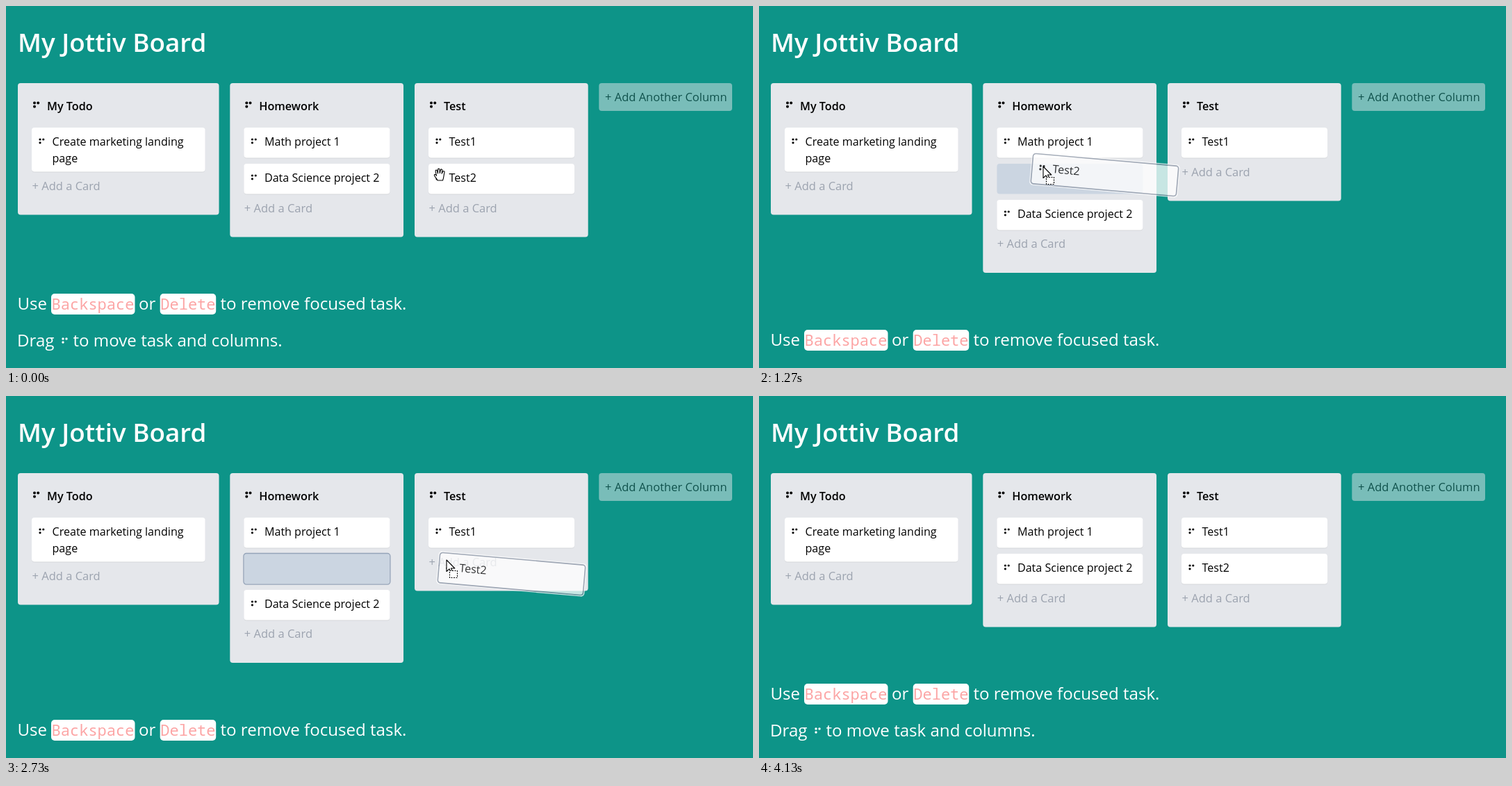
Recreate the animation shown at these times as an HTML page. Size 1075 by 521 pixels, loop 4.47 s.

```html
<!DOCTYPE html>
<html lang="en">
<head>
<meta charset="utf-8">
<title>Task board</title>
<style>
  html, body { margin: 0; width: 100%; height: 100%; overflow: hidden; background: #0d9488; }
  svg { display: block; width: 1075px; height: 521px; }
  text { font: 16.1px "Open Sans", "Noto Sans", sans-serif; fill: #000; white-space: pre; }
  .title { font-size: 36.8px; font-weight: 600; fill: #fff; }
  .head { font-size: 16.2px; font-weight: 600; }
  .add { font-size: 16.5px; fill: #9ca3af; }
  .note { font-size: 24.1px; fill: #fff; }
  .key { font: 22px "Noto Sans Mono", "DejaVu Sans Mono", monospace; fill: #fca5a5; }
  .cursor { fill: #fff; stroke: #000; stroke-width: 1.1; stroke-linejoin: round; }
</style>
</head>
<body>
<svg id="stage" viewBox="0 0 1075 521"></svg>
<script>
const LOOP = 4470;
const CARD_W = 210, CARD_H = 43.6, TILT = 5;

const text = (x, y, cls, str) => `<text x="${x}" y="${y}" class="${cls}">${str}</text>`;

const box = (x, y, w, h, fill, extra = '') =>
  `<rect x="${x}" y="${y}" width="${w}" height="${h}" rx="4" fill="${fill}" ${extra}/>`;

const dots = (x, y, r, gap, fill = '#000') =>
  [[0, 0], [gap, 0], [0, gap]].map(([dx, dy]) =>
    `<circle cx="${x + dx}" cy="${y + dy}" r="${r}" fill="${fill}"/>`).join('');

const cardBody = (lines, w, h) =>
  box(0, 0, w, h, '#fff') + dots(12, 17, 1.6, 4.8) +
  lines.map((line, i) => text(29.5, 25.5 + i * 24, '', line)).join('');

const card = (id, x, y, lines, w = CARD_W, h = CARD_H) =>
  `<g id="${id}" transform="translate(${x} ${y})">` +
  box(0, 1, w, h, '#000', 'opacity=".07"') + cardBody(lines, w, h) + '</g>';

const column = (id, x, w, h, name) =>
  box(x, 111, w, h, '#e5e7eb', `id="${id}"`) +
  dots(x + 24, 139.5, 2, 5.2) + text(x + 42, 150, 'head', name) +
  text(x + 20.5, 75 + h, 'add', '+ Add a Card').replace('<text', `<text id="${id}Add"`);

const key = (x, w, str) =>
  `<rect x="${x}" y="414" width="${w}" height="30" rx="5" fill="#fff"/>` + text(x + .6, 437, 'key', str);

const arrow = '<path d="M0 0V16.5L4 12.8L6.6 18.5L9 17.4L6.5 12H11.8Z"/>';
const cursors = {
  hand: `<path transform="translate(-8.5 -9)" d="M5.5 17.5C4 14 .5 11.5 .8 9.8C1.2 8.3 3 9 4 10.8L2.6 4.2
    C2.4 2.3 4.6 2 5 3.8L6 7.5V2C6 .2 8.4 .2 8.5 2L8.8 7L10 2.3C10.4 .8 12.6 1.2 12.3 3L11.6 7.8
    L13.2 4.8C14 3.3 16 4.2 15.5 5.8C14.5 9 14.8 13 13 17.5Z"/>`,
  drag: arrow + '<rect x="4.5" y="15.5" width="11" height="10" stroke-dasharray="2 1.5"/>',
  arrow,
  beam: '<path fill="none" d="M-3.5 -8H-1L0 -7L1 -8H3.5M0 -7V7M-3.5 8H-1L0 7L1 8H3.5"/>'
};

const stage = document.getElementById('stage');
stage.innerHTML =
  '<rect width="1075" height="521" fill="#0d9488"/>' +
  text(17, 66, 'title', 'My Jottiv Board') +
  column('todo', 17, 289.5, 189.5, 'My Todo') +
  column('work', 322.3, 249.7, 221.5, 'Homework') +
  column('test', 588, 249.7, 221.5, 'Test') +
  '<g opacity=".5">' + box(853.3, 111, 191.7, 40, '#e5e7eb') +
  text(862, 136.5, 'add', '+ Add Another Column').replace('<text', '<text style="fill:#111"') + '</g>' +
  card('create', 37, 175, ['Create marketing landing', 'page'], 249.6, 63.6) +
  card('math', 342.4, 175, ['Math project 1']) +
  card('test1', 608, 175, ['Test1']) +
  '<g id="moving">' +
  '<g id="filled">' + box(0, 1, CARD_W, CARD_H, '#000', 'opacity=".07"') +
  cardBody(['Test2'], CARD_W, CARD_H) + '</g>' +
  box(0, 0, CARD_W, CARD_H, '#cbd5e1', 'id="slot"') +
  box(-.5, -.5, CARD_W + 1, CARD_H + 1, 'none', 'id="ring" stroke="#94a3b8" stroke-width="1.3"') +
  '</g>' +
  card('data', 342.4, 227, ['Data Science project 2']) +
  '<g id="notes">' + text(16.5, 437, 'note', 'Use') + key(65, 120.5, 'Backspace') +
  text(191, 437, 'note', 'or') + key(221.7, 80.5, 'Delete') +
  text(308.5, 437, 'note', 'to remove focused task.') +
  text(16, 490, 'note', 'Drag') + dots(82, 479, 1.7, 5, '#fff') +
  text(96.5, 490, 'note', 'to move task and columns.') + '</g>' +
  '<g id="ghost" opacity=".77">' +
  box(-1.2, -1.2, CARD_W + 2.4, CARD_H + 2.4, 'none', 'stroke="#fff" stroke-width="1.6"') +
  cardBody(['Test2'], CARD_W, CARD_H) +
  box(0, 0, CARD_W, CARD_H, 'none', 'stroke="#8b95a5" stroke-width="1.6"') + '</g>' +
  Object.entries(cursors).map(([name, art]) => `<g id="${name}" class="cursor">${art}</g>`).join('');

// time, x, y, cursor shape
const pointer = [
  [0, 624, 242.5, 'hand'], [70, 625, 242.5, 'hand'], [200, 625, 242.5, 'hand'],
  [270, 625, 243.5, 'hand'], [470, 625, 243.5, 'hand'], [530, 605, 243, 'drag'],
  [800, 523, 241, 'drag'], [1000, 450, 232, 'drag'], [1270, 409, 231, 'drag'],
  [1330, 409, 231, 'drag'], [1400, 409, 235, 'hand'], [1600, 366, 244, 'hand'],
  [1800, 357, 245, 'hand'], [1870, 356, 240, 'drag'], [2070, 430, 238, 'drag'],
  [2200, 515, 236, 'drag'], [2600, 626, 233, 'drag'], [2730, 634, 236, 'drag'],
  [2870, 649, 225, 'drag'], [3130, 641, 209, 'drag'], [3200, 635, 207, 'drag'],
  [3330, 635, 207, 'drag'], [3400, 633, 206, 'hand'], [3470, 628, 210, 'hand'],
  [3530, 560, 248, 'arrow'], [3600, 465, 305, 'arrow'], [3730, 245, 410, 'arrow'],
  [3800, 165, 450, 'arrow'], [3870, 119, 475, 'beam'], [3930, 100, 484, 'beam'],
  [4000, 78, 497, 'arrow'], [4070, 60, 512, 'arrow'], [4130, 50, 540, 'arrow']
];

// time, left and top of the tilted card's bounds
const flight = [
  [470, 608, 219], [800, 512, 225], [1000, 434, 214], [1270, 391, 212], [1400, 391, 212],
  [1870, 340, 228], [2070, 416, 227], [2200, 500, 225], [2600, 612, 222], [2730, 621, 225],
  [2870, 636, 214], [3130, 629, 199], [3200, 623, 197]
];

function at(path, t) {
  let i = 0;
  while (i < path.length - 1 && path[i + 1][0] <= t) i++;
  const a = path[i], b = path[i + 1] || a;
  const k = b === a ? 0 : Math.max(0, (t - a[0]) / (b[0] - a[0]));
  return { x: a[1] + (b[1] - a[1]) * k, y: a[2] + (b[2] - a[2]) * k, kind: a[3] };
}

const smooth = v => {
  const k = Math.min(1, Math.max(0, v));
  return k * k * (3 - 2 * k);
};
const el = id => document.getElementById(id);
const set = (id, name, value) => el(id).setAttribute(name, value);
const show = (id, on) => set(id, 'visibility', on ? 'visible' : 'hidden');
const move = (id, x, y, rest = '') => set(id, 'transform', `translate(${x} ${y}) ${rest}`);

const OUT = 690, BACK = 2950, SLIDE = 250;

function draw(t) {
  const away = t >= OUT && t < BACK;
  const held = (t >= 530 && t < 1400) || (t >= 1870 && t < 3470);
  const shift = smooth((t - OUT) / SLIDE) - smooth((t - BACK) / SLIDE);

  set('work', 'height', away ? 273 : 221.5);
  set('test', 'height', away ? 169.5 : 221.5);
  set('workAdd', 'y', away ? 348 : 296.5);
  set('testAdd', 'y', away ? 244.5 : 296.5);
  move('notes', 0, away ? 52 : 0);

  move('data', 342.4, 227 + 52 * shift);
  move('moving', 608 - 265.6 * shift, 227);
  show('slot', held);
  show('filled', !held);
  show('ring', t >= 1600 && t < BACK);

  const g = at(flight, t);
  show('ghost', held);
  move('ghost', g.x + 106.5, g.y + 31, `rotate(${TILT}) translate(${-CARD_W / 2} ${-CARD_H / 2})`);

  const p = at(pointer, t);
  for (const name in cursors) show(name, name === p.kind && t < 4130);
  move(p.kind, p.x, p.y);
}

const start = performance.now();
function tick() {
  const t = (performance.now() - start) % LOOP;
  draw(Math.round(Math.floor((t + 4) * .015) * 20 / 3) * 10 % LOOP);
  requestAnimationFrame(tick);
}
tick();
</script>
</body>
</html>
```
